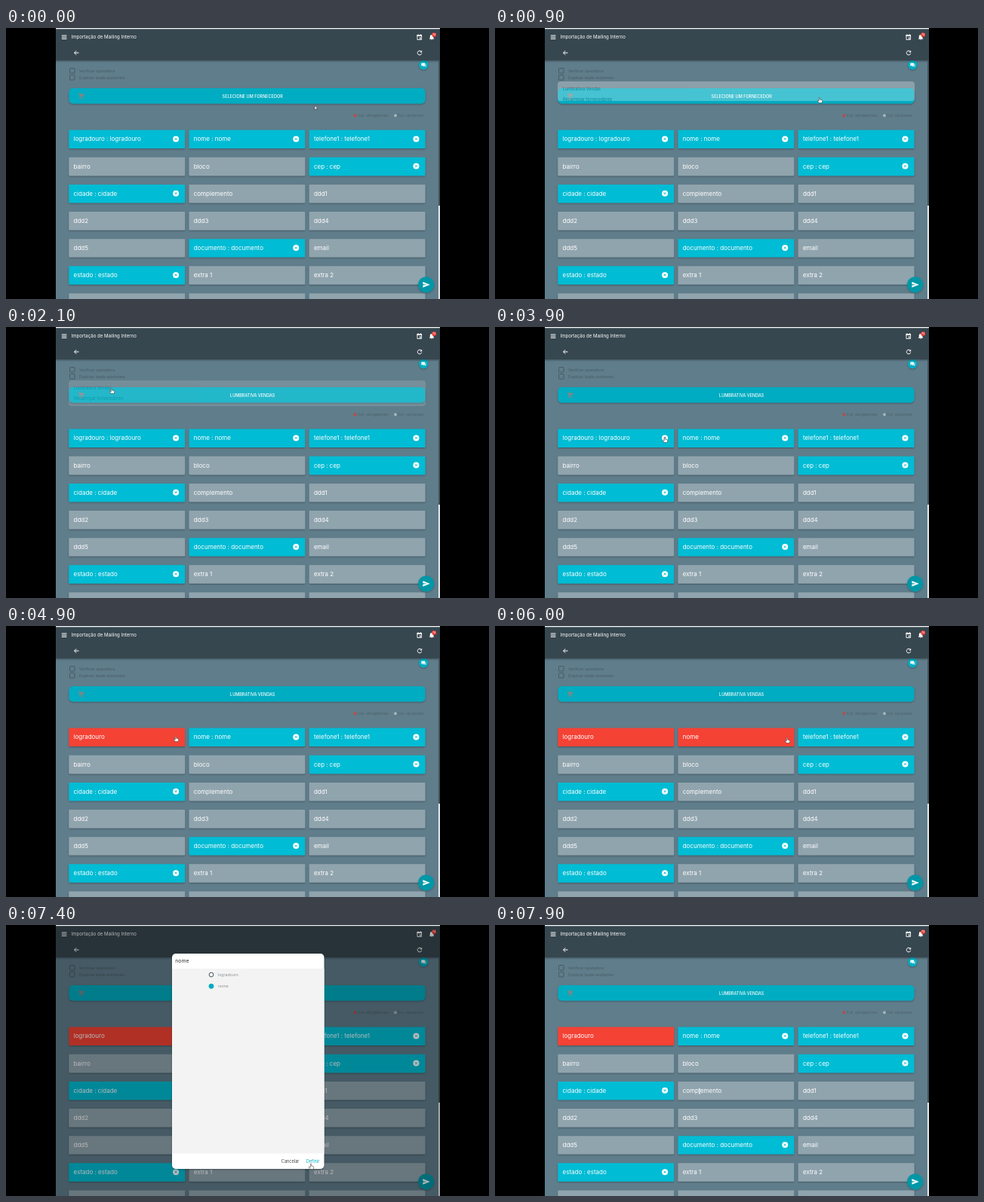
Animation of 640 by 360 pixels, one loop 8 s. Source, as an HTML page:

```html
<!DOCTYPE html>
<html lang="pt-BR">
<head>
<meta charset="utf-8">
<title>Importação de Mailing Interno</title>
<style>
html, body { margin: 0; width: 100%; height: 100%; overflow: hidden; background: #000; }
svg { display: block; width: 100%; height: 100%; }
text { font-family: Inter, Roboto, sans-serif; }
</style>
</head>
<body>
<svg viewBox="0 0 640 360" xmlns="http://www.w3.org/2000/svg">
  <defs>
    <filter id="soft" x="-10%" y="-30%" width="120%" height="180%">
      <feDropShadow dx="0" dy="1" stdDeviation="1" flood-color="#000" flood-opacity=".32"/>
    </filter>
    <linearGradient id="fall" x2="0" y2="1">
      <stop offset="0" stop-color="#000" stop-opacity=".28"/>
      <stop offset="1" stop-color="#000" stop-opacity="0"/>
    </linearGradient>
    <clipPath id="page"><rect x="66" width="509" height="360"/></clipPath>
    <clipPath id="menuClip"><rect id="menuBox" x="83" y="71" width="473" height="34" rx="4"/></clipPath>
  </defs>
  <rect width="640" height="360" fill="#000"/>
  <g clip-path="url(#page)">
    <rect x="66" width="509" height="360" fill="#607d8b"/>

    <!-- options -->
    <g fill="none" stroke="#475b65">
      <rect x="84.5" y="53.5" width="6.5" height="6.5" rx=".8"/>
      <rect x="84.5" y="62.5" width="6.5" height="6.5" rx=".8"/>
    </g>
    <g fill="#475b65" font-size="5.15">
      <text x="97" y="58.7">Verificar operadora</text>
      <text x="97" y="68">Duplicar leads existentes</text>
    </g>
    <circle cx="462.5" cy="116.3" r="2" fill="#bd4a48"/>
    <circle cx="516" cy="116.3" r="2" fill="#a3b3bb"/>
    <g fill="#4b606a" font-size="5.2">
      <text x="466" y="118.2">Col. obrigatórias</text>
      <text x="518.5" y="118.2">Col. opcionais</text>
    </g>

    <!-- supplier button -->
    <rect x="83.5" y="80" width="472" height="20.5" rx="5" fill="#00acc1" filter="url(#soft)"/>
    <g fill="#7e8688">
      <path d="M96 86.6h1.5l.5 1h5.7l-1.8 3.6h-3.3l-.5 1h5v.9h-6.4l1-2.3-1.3-3.3H96z"/>
      <circle cx="98.4" cy="94" r=".8"/><circle cx="102.3" cy="94" r=".8"/>
    </g>
    <text id="label" x="326.7" y="92.5" font-size="5.5" font-weight="500" fill="#fff" text-anchor="middle"></text>

    <g id="cards"></g>

    <!-- supplier menu -->
    <g id="menu" clip-path="url(#menuClip)">
      <rect x="83" y="71" width="473" height="34" fill="#fff"/>
      <g fill="#1c2a30" font-size="5.5">
        <text x="90" y="83">Lumbrativa Vendas</text>
        <text x="90" y="97.2">Recarregar fornecedores</text>
      </g>
    </g>

    <!-- floating buttons -->
    <circle cx="553.3" cy="49" r="6.2" fill="#00acc1" filter="url(#soft)"/>
    <path d="M550.4 46.5h4.6v3.2h-3.4l-1.2 1.2zM555.6 47.6h.8v4.2l-1.1-1.1h-3.2v-.6h3.5z" fill="#fff"/>
    <circle cx="556.7" cy="341" r="10.6" fill="#0097a7" filter="url(#soft)"/>
    <path d="M552.4 337.2l9.4 3.8-9.4 3.8v-3l6-.8-6-.8z" fill="#fff"/>

    <!-- header -->
    <rect x="66" width="509" height="43" fill="#37474f"/>
    <rect x="66" y="43" width="507" height="3" fill="url(#fall)"/>
    <path d="M73.8 10h6.6M73.8 12.2h6.6M73.8 14.4h6.6" stroke="#fff" stroke-width="1"/>
    <text x="86.6" y="14.3" font-size="6.1" fill="#fff">Importação de Mailing Interno</text>
    <path d="M96.5 33h-5.7M93.2 30.3L90.5 33l2.7 2.7" fill="none" stroke="#fff" stroke-width="1"/>
    <path d="M550.2 31.2a2.8 2.8 0 1 0 .6 2.6" fill="none" stroke="#fff" stroke-width="1"/>
    <path d="M551.2 29.8v2.8h-2.8z" fill="#fff"/>
    <path d="M545 9.5h5.6v6H545z" fill="none" stroke="#fff" stroke-width=".9"/>
    <path d="M544.6 9h6.4v1.9h-6.4zM547.8 12.6h1.8v1.8h-1.8zM545.6 8.2h.9v1h-.9zM549.1 8.2h.9v1h-.9z" fill="#fff"/>
    <path d="M561 14.8v-.6l.8-.8v-2.2a2.3 2.3 0 0 1 4.6 0v2.2l.8.8v.6zM563.3 15.2h1.6a.8.8 0 0 1-1.6 0z" fill="#fff"/>
    <circle cx="567.2" cy="9" r="3" fill="#e53935"/>
    <text x="567.2" y="10.4" font-size="3.8" fill="#fff" text-anchor="middle">74</text>

    <rect x="66" width="509" height="1.3" fill="#f3f5f6"/>
    <rect x="573" y="43" width="2" height="193" fill="#43565f"/>
    <rect x="573" y="236" width="2" height="124" fill="#e8edef"/>

    <!-- dialog -->
    <rect id="shade" x="66" y="1" width="509" height="359" fill="#000"/>
    <g id="dialog">
      <rect x="220" y="38" width="201.5" height="286" rx="5" fill="#fff" filter="url(#soft)"/>
      <rect x="220" y="58" width="201.5" height="245.5" fill="#f3f3f3"/>
      <text x="224.3" y="49.6" font-size="6.9" fill="#333">nome</text>
      <g fill="none" stroke-width="1">
        <circle cx="272" cy="66" r="2.9" stroke="#4d5960"/>
        <circle id="ring" cx="272" cy="81.3" r="2.9"/>
      </g>
      <circle id="dot" cx="272" cy="81.3" r="3.2" fill="#00acc1"/>
      <g font-size="5.2" fill="#8b8f91">
        <text x="281" y="67.9">logradouro</text>
        <text x="281" y="83.2">nome</text>
      </g>
      <text x="364.8" y="316" font-size="5.6" fill="#444">Cancelar</text>
      <text x="397.8" y="316" font-size="5.6" fill="#00acc1">Definir</text>
    </g>

    <!-- pointers -->
    <g id="pointer" stroke="#222" stroke-width=".5" stroke-linejoin="round" fill="#fff">
      <path id="arrow" d="M0 0v5.6l1.3-1.2.9 2 .9-.4-.9-1.9h1.7z"/>
      <path id="hand" d="M-.7 .5q.7-.8 1.4 0v2.6l2.4.6q.8.3.7 1.2l-.5 2.6h-3.8l-2.3-2.7q.2-.9 1.1-.5l1 .7z"/>
      <path id="beam" d="M-1.2-3h2.4M0-3v6M-1.2 3h2.4" fill="none" stroke="#fff" stroke-width=".8"/>
    </g>
  </g>
</svg>
<script>
const LOOP = 8000, TICK = 100;
const $ = id => document.getElementById(id);
const CYAN = '#00bcd4', GRAY = '#90a4ae', RED = '#f44336';
const rows = [
  ['logradouro', 'nome', 'telefone1'],
  ['bairro', 'bloco', 'cep'],
  ['cidade', 'complemento', 'ddd1'],
  ['ddd2', 'ddd3', 'ddd4'],
  ['ddd5', 'documento', 'email'],
  ['estado', 'extra 1', 'extra 2'],
  ['', '', '']
];
const linked = ['logradouro', 'nome', 'telefone1', 'cep', 'cidade', 'documento', 'estado'];
const cards = {};

function add(parent, tag, attrs) {
  const el = document.createElementNS('http://www.w3.org/2000/svg', tag);
  for (const k in attrs) el.setAttribute(k, attrs[k]);
  return parent.appendChild(el);
}

function makeCard(name, col, row) {
  const x = 83.3 + col * 159.2, y = 135.6 + row * 36.15;
  const g = add($('cards'), 'g', {});
  const box = add(g, 'rect', { x, y, width: 153.8, height: 24.4, rx: .8, filter: 'url(#soft)' });
  const text = add(g, 'text', { x: x + 6.2, y: y + 14.8, 'font-size': 8, fill: '#fff' });
  const cx = x + 141.8, cy = y + 11.8;
  const close = add(g, 'g', {});
  add(close, 'circle', { cx, cy, r: 4, fill: '#fff' });
  add(close, 'path', {
    d: `M${cx - 1.5} ${cy - 1.5}l3 3m0-3l-3 3`, stroke: CYAN, 'stroke-width': .9
  });
  const set = on => {
    const known = linked.includes(name);
    box.setAttribute('fill', on ? CYAN : known ? RED : GRAY);
    text.textContent = on ? `${name} : ${name}` : name;
    close.setAttribute('visibility', on ? 'visible' : 'hidden');
  };
  set(linked.includes(name));
  if (name) cards[name] = set;
}
rows.forEach((r, j) => r.forEach((name, i) => makeCard(name, i, j)));

// time, x, y of the pointer
const path = [
  [0, 409, 103], [500, 430, 92], [1100, 430, 92], [1700, 140, 81], [2600, 140, 81],
  [2700, 194, 117], [3000, 194, 117], [3600, 225, 146], [4900, 225, 146],
  [5600, 387, 148], [6500, 387, 148], [6850, 272, 79], [7000, 272, 79],
  [7350, 404, 317], [7600, 404, 317], [7900, 271, 221]
];

const clamp = v => Math.max(0, Math.min(1, v));
const ramp = (t, a, b) => clamp((t - a) / (b - a));
const ease = u => u * u * (3 - 2 * u);
const show = (id, on) => $(id).setAttribute('visibility', on ? 'visible' : 'hidden');

function pointAt(t) {
  let i = 0;
  while (i < path.length - 2 && t > path[i + 1][0]) i++;
  const [a, x, y] = path[i], [b, X, Y] = path[i + 1];
  const u = ease(ramp(t, a, b));
  return [x + (X - x) * u, y + (Y - y) * u];
}

function pointerKind(t, x, y) {
  if (t >= 6400 && t < 7700) {
    const radio = Math.abs(x - 272) < 5 && y < 86;
    return radio || (x > 394 && y > 306) || t < 6500 ? 'hand' : 'arrow';
  }
  if (t >= 7700) return t >= 7900 ? 'beam' : 'arrow';
  const inRow = y > 135 && y < 160 && (x < 237 || x > 243);
  return (y > 71 && y < 101) || inRow ? 'hand' : 'arrow';
}

function draw(t) {
  $('label').textContent = t < 2000 ? 'SELECIONE UM FORNECEDOR' : 'LUMBRATIVA VENDAS';

  const open = ramp(t, 800, 1000), shut = 1 - ramp(t, 1900, 2150);
  $('menu').setAttribute('opacity', t < 1500 ? open * (.5 + .5 * ramp(t, 900, 1000)) * 1.1 : shut * .6 + .4 * shut * shut);
  $('menuBox').setAttribute('height', t < 1500 ? 34 * Math.sqrt(open) + 2 * open * (1 - open) * 4 : 34);

  cards.logradouro(t < 4400);
  cards.nome(t < 5900 || t >= 7700);

  const fade = ease(ramp(t, 6300, 6550)) * (1 - ramp(t, 7600, 7800));
  const dim = t < 7600 ? fade : 1 - ramp(t, 7650, 7850);
  const seen = t < 7700 ? (t > 7500 ? 1 : fade) : 1 - ramp(t, 7650, 7800);
  $('shade').setAttribute('opacity', .28 * dim);
  $('dialog').setAttribute('opacity', seen);
  const k = t < 7000 ? .85 + .15 * fade : 1;
  $('dialog').setAttribute('transform', `translate(320.7 181) scale(${k}) translate(-320.7 -181)`);
  $('ring').setAttribute('stroke', t < 7000 ? '#4d5960' : '#00acc1');
  show('dot', t >= 7000);

  const [x, y] = pointAt(t), kind = pointerKind(t, x, y);
  $('pointer').setAttribute('transform', `translate(${x} ${y})`);
  for (const id of ['arrow', 'hand', 'beam']) show(id, id === kind);
}

function loop(now) {
  const t = now % LOOP;
  draw(Math.floor(t / TICK) * TICK);
  requestAnimationFrame(loop);
}
draw(0);
requestAnimationFrame(loop);
</script>
</body>
</html>
```
